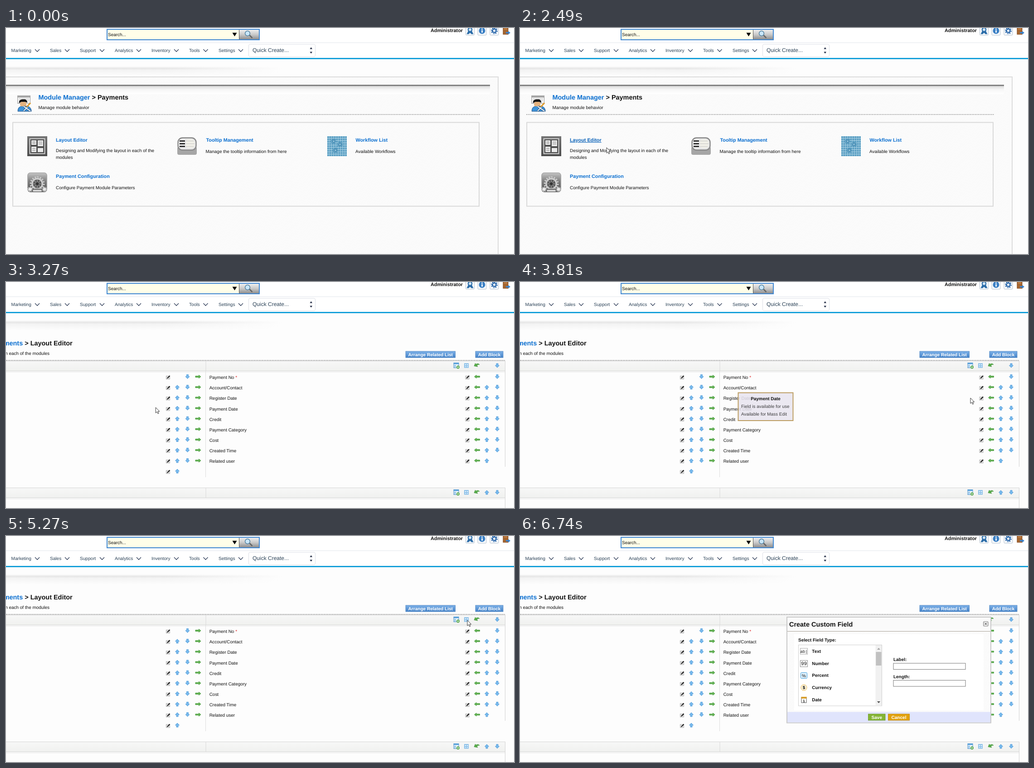
An HTML page that plays this animation: 1121x499 px, repeating every 7990 ms.

```html
<!DOCTYPE html>
<html lang="en">
<head>
<meta charset="utf-8">
<title>Layout editor walkthrough</title>
<style>
html, body { margin: 0; width: 100%; height: 100%; overflow: hidden; background: #fdfdfd; }
svg { display: block; width: 1121px; height: 499px; }
text { font: 9.95px Arial, "Liberation Sans", sans-serif; fill: #111; text-rendering: geometricPrecision; white-space: pre; }
.b { font-weight: bold; }
.h { font-weight: bold; font-size: 14.45px; }
.l { font-weight: bold; font-size: 10.8px; fill: #0b6fd0; }
.n { font-size: 10.1px; fill: #2b4257; }
.w { font-weight: bold; font-size: 10.05px; fill: #fff; }
</style>
</head>
<body>
<svg id="stage" viewBox="0 0 1121 499" xmlns="http://www.w3.org/2000/svg"></svg>
<script>
const LOOP = 7990;
const list = (n, f) => Array.from({ length: n }, (_, i) => f(i)).join('');
const text = (x, y, s, cls = '', more = '') => `<text x="${x}" y="${y}" class="${cls}" ${more}>${s}</text>`;
const rect = (x, y, w, h, fill, more = '') => `<rect x="${x}" y="${y}" width="${w}" height="${h}" fill="${fill}" ${more}/>`;
const path = (d, fill, more = '') => `<path d="${d}" fill="${fill}" ${more}/>`;
const line = (d, stroke, w = 1, more = '') => path(d, 'none', `stroke="${stroke}" stroke-width="${w}" ${more}`);
const disc = (x, y, r, fill, more = '') => `<circle cx="${x}" cy="${y}" r="${r}" fill="${fill}" ${more}/>`;
const use = (id, x, y) => `<use href="#${id}" x="${x}" y="${y}"/>`;
const group = (id, body, more = '') => `<g id="${id}" ${more}>${body}</g>`;
const gear = (x, y, r, teeth, fill, w = r * .5) =>
  disc(x, y, r, fill) + disc(x, y, r + w / 2, 'none', `stroke="${fill}" stroke-width="${w}" pathLength="${teeth * 2}" stroke-dasharray="1"`);
const fade = (id, dir, ...stops) =>
  `<linearGradient id="${id}" x2="${dir === 'x' ? 1 : 0}" y2="${dir === 'x' ? 0 : 1}">` +
  stops.map(([o, c, a = 1]) => `<stop offset="${o}" stop-color="${c}" stop-opacity="${a}"/>`).join('') + '</linearGradient>';

const defs = '<defs>' +
  `<pattern id="hatch" width="3.6" height="3.6" patternUnits="userSpaceOnUse" viewBox="0 0 4 4">${rect(0, 0, 4, 4, '#fdfdfd')}${line('M-1 1L1 -1M0 4L4 0M3 5L5 3', '#f3f3f3', 1)}</pattern>` +
  fade('swoosh', 'y', [0, '#fbfbfb'], [.2, '#e6e6e6'], [.35, '#f3f3f3'], [1, '#fdfdfd']) +
  fade('toWhite', 'x', [0, '#fdfdfd', 0], [1, '#fdfdfd']) +
  fade('shade', 'y', [0, '#555'], [.1, '#888'], [.16, '#dedede'], [.5, '#f6f6f6'], [1, '#fff']) +
  fade('steel', 'y', [0, '#eee'], [.5, '#c9c9c9'], [1, '#8f8f8f']) +
  fade('dark', 'y', [0, '#747474'], [1, '#4c4c4c']) +
  fade('plate', 'y', [0, '#c4c4c4'], [.45, '#7c7c7c'], [1, '#4a4a4a']) +
  fade('bar', 'y', [0, '#f7f7f7'], [1, '#f0f1ef']) +
  fade('blue', 'y', [0, '#7db1e8'], [1, '#4583c8']) +
  group('down', path('M-2 -4.5H2V-.3H4.5L0 4.5L-4.5 -.3H-2Z', '#78bbee', 'stroke="#4391d3" stroke-width=".8"')) +
  group('up', path('M-2 4.5H2V.3H4.5L0 -4.5L-4.5 .3H-2Z', '#78bbee', 'stroke="#4391d3" stroke-width=".8"')) +
  group('right', path('M-6 -1.4H1.5V-3.6L6 0L1.5 3.6V1.4H-6Z', '#65b553', 'stroke="#3c9134" stroke-width=".8"')) +
  group('left', path('M6 -1.4H-1.5V-3.6L-6 0L-1.5 3.6V1.4H6Z', '#65b553', 'stroke="#3c9134" stroke-width=".8"')) +
  group('edit', rect(-4.5, -3, 8, 7, '#e4e4e4', 'stroke="#a5a5a5" stroke-width=".8"') +
    line('M-2 2L3.5 -3.5', '#222', 2.3) + line('M-2.8 2.8L-1.8 1.8', '#222', 1)) +
  group('addField', rect(-6, -6, 11, 11, '#eef6fd', 'stroke="#4a90c8"') + rect(-6, -6, 11, 3, '#5aa2dc') +
    rect(-4.5, -1.5, 3, 5.5, '#8ec0e6') + disc(3.5, 3.5, 3.4, '#52a447') + line('M1.6 3.5H5.4M3.5 1.6V5.4', '#fff')) +
  group('grid', rect(-5, -5, 10, 10, '#7fb9e6') + rect(-3.5, -3, 3, 2.5, '#eaf5fd') + rect(.8, -3, 3, 2.5, '#eaf5fd') +
    rect(-3.5, 1, 3, 2.5, '#d5eafa') + rect(.8, 1, 3, 2.5, '#d5eafa')) +
  group('undo', path('M-6 1L-3.5 -5L-2 -3Q3 -6 6 -2Q2 -3 .3 .2L2 2.5Z', '#58ad4a', 'stroke="#3b8c35" stroke-width=".7"')) +
  group('arrow', path('M0 0V12.2L2.9 9.6L4.9 14L6.8 13.1L4.9 8.9H8.6Z', '#fff', 'stroke="#222" stroke-width=".9" stroke-linejoin="round"')) +
  group('hand', path('M-1.4 1Q0 -1 1.3 1V6Q2.5 5 3.4 6.3Q4.6 5.4 5.4 6.8Q7 6.2 7.2 8V11Q7 13 5.8 15.3H-.6Q-1.2 13 -4 9.6Q-4.2 7.8 -2.7 8.2L-1.4 9.4Z', '#fff',
    'stroke="#222" stroke-width=".9" stroke-linejoin="round"') + line('M1.3 6V9M3.4 6.5V9M5.4 7V9', '#444', .6)) +
  '</defs>';

// Search box and account icons move when the page has no scroll bar.
function topBar(id, x, w, dx) {
  const bx = x + w - 45.5;
  const tile = cx => rect(cx - 9.5, -4, 19, 20, '#f5f8fb', 'rx="2" stroke="#b7c3d0"');
  const user = tile(1024) + path('M1016.5 13.5L1020 6.5H1028L1031.5 13.5H1027L1024 10.5L1021 13.5Z', '#2b6ca8') +
    disc(1024, 3.6, 4.2, '#cfe3f3', 'stroke="#2b6ca8" stroke-width="2.2"');
  const info = tile(1050.5) + disc(1050.5, 6, 7, '#3a7fc4') + rect(1049.3, 4.8, 2.6, 5.5, '#fff') + disc(1050.5, 2.4, 1.4, '#fff');
  const cog = tile(1077.5) + gear(1077.5, 6, 5, 8, '#1f5fa6', 2.4) + disc(1077.5, 6, 2.7, '#f5f8fb');
  const door = rect(1097, -2, 11, 16, '#a5652f', 'stroke="#84491c"') + rect(1099, -1, 7, 5, '#b97a41') +
    path('M1103 9H1108V6.5L1113 10.5L1108 14.5V12H1103Z', '#3b83cc');
  return group(id,
    rect(x + 1, 3, w - 2, 23, '#fffee9', 'stroke="#3f87d2" stroke-width="2"') +
    rect(bx, 4, 43.5, 21, 'url(#steel)') + line(`M${bx} 4V25`, '#555') +
    text(x + 3, 18, 'Search...') + path(`M${bx - 15} 10.5H${bx - 5}L${bx - 10} 18.5Z`, '#000') +
    line(`M${bx + 23} 16L${bx + 29} 22`, '#666', 2.6) +
    disc(bx + 18.5, 12, 5.4, '#c9e6f7', 'stroke="#4f7f9f" stroke-width="1.5"') +
    `<g transform="translate(${dx})">${text(937, 9, 'Administrator', 'b', 'style="font-size:10.83px"')}${user}${info}${cog}${door}</g>`);
}

const menu = [['Marketing', 11.5, 69], ['Sales', 97, 135], ['Support', 163, 212], ['Analytics', 240, 293], ['Inventory', 321, 376], ['Tools', 404, 440.5], ['Settings', 469, 518]];
const nav = rect(0, 0, 1121, 67, '#fff') + line('M0 32.5H1121', '#e3e6ec') + rect(0, 66, 1121, 2.8, '#0b9cd8') +
  menu.map(([s, x, c]) => text(x, 53, s, 'n') + line(`M${c - 5} 47L${c} 52.2L${c + 5} 47`, '#33415c', 1.3)).join('') +
  rect(535.5, 36, 147, 27.5, '#fff', 'rx="3" stroke="#dcdfe6"') +
  text(544, 53.3, 'Quick Create...', 'n', 'style="font-size:12px"') +
  path('M670.5 46.5H676L673.2 42.5ZM670.5 52.5H676L673.2 56.5Z', '#1d2740') +
  rect(0, 85, 610, 22, 'url(#swoosh)') + rect(350, 85, 261, 22, 'url(#toWhite)');

const dots = (x, y, end) => line(`M${x} ${y}H${end}`, '#a0a0a0', 1.9, 'stroke-dasharray="1.8"');

const managerIcon = rect(25.5, 149.5, 28, 17, '#f3f3f3', 'stroke="#999"') + rect(25, 149, 29, 4.5, '#a5a5a5') +
  line('M28 156.5H51M28 160H51', '#c4c4c4') + path('M26 184Q26 173 36 172.5H46Q56 174 56 184Z', '#3f94da', 'stroke="#1d4f85"') +
  rect(31, 163, 14, 10, '#e4b27e', 'rx="4"') + path('M28.5 166Q28 158 36 157.5H42Q47 159 47 165L42 163H34Z', '#151515') +
  line('M45 175L54 165.5', '#dd9a2c', 3.2) + line('M39 173L54 183.5M39 183L47 175', '#234d78', 4) + line('M39 173L54 183.5M39 183L47 175', '#e4eef7', 2.4);

const layoutIcon = rect(47, 239, 44, 44, 'url(#dark)') + rect(52.5, 244.5, 33, 33, '#505050', 'stroke="#d6d6d6" stroke-width="2"') +
  rect(56, 248, 11, 10, '#e9e9e9') + rect(70, 248, 12, 13, '#e9e9e9') + rect(56, 262, 11, 12, '#e9e9e9') + rect(70, 265, 12, 9, '#e9e9e9') +
  line('M58 251.5H65M58 254.5H65M72 252H80M72 256H80M58 266H65M58 270H65', '#777', 1.2);

const tipIcon = rect(378, 262, 43, 18, '#a6a6a6', 'rx="4"') + rect(379.5, 242.5, 40, 27, '#e8e8e8', 'rx="10" stroke="#898989" stroke-width="2.4"') +
  rect(397, 246, 19, 19, '#f1f0e8', 'rx="6"') + line('M383 249.5H395M383 255.5H395M383 261.5H395', '#111', 2.4) + line('M397 249.5H414M397 255.5H416M397 261.5H414', '#c6c6c6');

const flowIcon = rect(709, 239, 43, 44, '#5b9fc3') +
  line(list(8, i => `M${713 + i * 5} 239v44`) + list(8, i => `M709 ${243.5 + i * 5}h43`), '#b4d7e8', .9) +
  [[723, 250], [737, 257], [727, 270]].map(([x, y]) => gear(x, y, 4.2, 8, '#5094ba') + disc(x, y, 1.5, '#a5cfe3')).join('');

const cogIcon = rect(47.8, 319.8, 42.4, 42.4, 'url(#plate)', 'rx="6" stroke="#a8a8a8" stroke-width="1.6"') +
  gear(69, 344, 13, 16, '#cdcdcd', 3.5) + disc(69, 344, 9.5, '#5a5a5a') +
  line(list(8, i => `M69 344L${69 + 9 * Math.cos(i * Math.PI / 4)} ${344 + 9 * Math.sin(i * Math.PI / 4)}`), '#a9a9a9', 1.2) + disc(69, 344, 3.2, '#333') +
  rect(50, 355, 38, 6, '#5f5f5f') + gear(53, 356, 3.6, 8, '#e8e8e8') + gear(85, 356, 3.6, 8, '#e8e8e8') + rect(59, 357, 20, 4, '#d2d2d2', 'rx="2"');

const modulePage = group('modules',
  rect(-5, 108, 1091, 400, 'url(#hatch)', 'stroke="#dcdcdc" stroke-width="2"') +
  rect(0, 125.5, 1068, 20.5, 'url(#shade)') + managerIcon +
  text(71.5, 158, '<tspan fill="#0b6fd0">Module Manager</tspan> &gt; Payments', 'h') +
  text(71.5, 179, 'Manage module behavior') + dots(14, 191, 1046) +
  rect(15, 208.5, 1029, 185, 'none', 'stroke="#d9d9d9" stroke-width="2"') +
  layoutIcon + tipIcon + flowIcon + cogIcon +
  text(110, 251, 'Layout Editor', 'l', 'id="link"') +
  text(110, 274, 'Designing and Modifying the layout in each of the') + text(110, 288.5, 'modules') +
  text(441.5, 251, 'Tooltip Management', 'l') + text(440.5, 276, 'Manage the tooltip information from here') +
  text(771.5, 251, 'Workflow List', 'l') + text(771, 276, 'Available Workflows') +
  text(110, 330.5, 'Payment Configuration', 'l') + text(110, 355.7, 'Configure Payment Module Parameters'));

const button = (x, w, s, fill, edge) => rect(x, 153, w, 14, fill, `stroke="${edge}" stroke-width=".8"`) +
  text(x + w / 2, 163.6, s, 'w', 'text-anchor="middle"');
const buttons = (dx, fill, edge) => button(882 + dx, 109.5, 'Arrange Related List', fill, edge) + button(1036 + dx, 61, 'Add Block', fill, edge);

const heading = text(146.7, 140, '<tspan fill="#0b6fd0">Module Manager &gt; Payments</tspan> &gt; Layout Editor', 'h', 'text-anchor="end"') +
  text(96, 161, 'Designing and Modifying the layout in each of the modules', '', 'text-anchor="end"');

const blockBar = (y, icons) => rect(0, y, 1102, 22, 'url(#bar)') + line(`M0 ${y + 22}H1102M0 ${y}H1102`, '#d5d5d5') +
  line(`M0 ${y + 24.5}H1102`, '#e6e6e6') + line(`M441 ${y}V${y + 22}`, '#d8d8d8') +
  icons.map(([id, x]) => use(id, x, y + 10)).join('');
const tools = [['addField', 994], ['grid', 1016], ['undo', 1039], ['down', 1084]];
const labels = ['Payment No <tspan fill="#d22">*</tspan>', 'Account/Contact', 'Register Date', 'Payment Date', 'Credit', 'Payment Category', 'Cost', 'Created Time', 'Related user'];
const rowY = i => 210 + i * 23.17;
const controls = (i, last, xs, side, sideLast) => {
  const y = rowY(i);
  return use('edit', xs[0], y + .5) + (i ? use('up', xs[1], y - 1) : '') + (i < last ? use('down', xs[2], y - 1) : '') +
    (i < last || sideLast ? use(side, xs[3], y - 1) : '');
};

const emptyPage = group('empty', heading + buttons(15, '#566dae', '#4a5e9c') + dots(0, 173, 1117));

const editorPage = group('editor', heading + buttons(0, 'url(#blue)', '#4a80bd') +
  blockBar(174.5, tools) + blockBar(454.5, [...tools, ['up', 1061]]) + dots(0, 173, 1102) +
  line('M440.5 197V431', '#dedede') + line('M1101.5 175V408M1101.5 455V499', '#d2d2d2') +
  labels.map((s, i) => text(448.7, rowY(i) + 4, s)).join('') +
  list(10, i => controls(i, 9, [358, 378, 400.5, 424], 'right', false)) +
  list(9, i => controls(i, 8, [1018.5, 1061, 1084, 1039.5], 'left', true)));

const tooltip = group('tip', rect(481.5, 244.5, 121, 61.5, '#e9e5ef', 'fill-opacity=".87" stroke="#bd9e62" stroke-width="2"') +
  text(542, 260.5, 'Payment Date', 'b', 'text-anchor="middle"') +
  text(488, 277.5, 'Field is available for use', '', 'fill-opacity=".8"') + text(488, 295, 'Available for Mass Edit', '', 'fill-opacity=".8"'));

const mono = 'text-anchor="middle" style="font:9px \'Liberation Mono\',monospace"';
const typeIcons = [
  y => rect(618.5, y - 6, 16, 13, '#fff', 'stroke="#aaa"') + text(626.5, y + 4, 'ab|', '', mono),
  y => rect(618.5, y - 6, 16, 14, '#fff', 'stroke="#888"') + text(626.5, y + 4.5, '99', '', mono.replace('9px', '11px')),
  y => rect(619.5, y - 6, 14, 13, '#dff1fc', 'rx="2" stroke="#3f9ddb"') + text(626.5, y + 4.2, '%', '', 'text-anchor="middle"'),
  y => disc(626.5, y + .5, 6.5, '#fff6dc', 'stroke="#e5b44d"') + text(626.5, y + 4, '$', 'b', 'text-anchor="middle"'),
  y => rect(621, y - 5, 11, 12, '#fff', 'stroke="#555"') + rect(620.5, y - 6, 12, 4, '#d9a030') + text(626.5, y + 6, '1', 'b', 'text-anchor="middle" style="font-size:8px"')
];
const action = (x, w, s, fill, edge) => rect(x, 393, w, 14, fill, `stroke="${edge}" stroke-width=".8"`) + text(x + w / 2, 403.6, s, 'w', 'text-anchor="middle"');
const dialog = group('dialog',
  rect(589, 179, 450, 233.5, 'url(#hatch)', 'stroke="#c9c9c9" stroke-width="2"') +
  rect(590, 180, 448, 30, '#fafafa') + line('M590 210.5H1038', '#aaa398', 1.2) +
  text(594, 199.5, 'Create Custom Field', 'h') +
  rect(1022.8, 189, 10, 10, '#fff', 'rx="1.5" stroke="#777" stroke-width="1.2"') + line('M1025.3 191.5l5 5m0 -5l-5 5', '#666', 1.2) +
  rect(605, 217, 418, 168, '#fff') + rect(590, 388.5, 448, 23, '#e0e4fc') +
  text(614, 233, 'Select Field Type:', 'b') + rect(614.5, 240.5, 184, 134.5, '#fff', 'stroke="#cfcfcf"') +
  rect(784.5, 241, 13.5, 133.5, '#f1f1f1') + rect(785.3, 256, 12, 30, '#c1c1c1') +
  path('M788 251H795L791.5 247Z', '#a3a3a3') + path('M788 365H795L791.5 369Z', '#505050') +
  ['Text', 'Number', 'Percent', 'Currency', 'Date'].map((s, i) => typeIcons[i](254 + i * 26.75) + text(644.3, 257.8 + i * 26.75, s, 'b')).join('') +
  text(824, 276, 'Label:', 'b') + text(824, 314, 'Length:', 'b') +
  rect(824, 281, 159, 13.5, '#fff', 'stroke="#777"') + rect(824, 318.5, 159, 13.5, '#fff', 'stroke="#777"') +
  action(768.5, 37.5, 'Save', '#84b434', '#6d9928') + action(812.5, 47, 'Cancel', '#e2a20e', '#bd8607'));

const stage = document.getElementById('stage');
stage.innerHTML = defs + rect(0, 0, 1121, 499, '#fdfdfd') + nav + topBar('top', 222, 338, 0) + topBar('topWide', 227, 342, 15.3) +
  modulePage + emptyPage + editorPage + tooltip + dialog + '<use id="cursor" href="#arrow"/>';
const el = id => document.getElementById(id);

// Pointer strokes: first step, last step, number of steps, way points.
const strokes = [
  [210, 920, 10, [[1090, 522], [820, 370], [510, 262], [270, 214], [110, 224]]],
  [1070, 1250, 4, [[110, 224], [133, 251]]],
  [2030, 2110, 2, [[133, 251], [177, 262]]],
  [2260, 2490, 4, [[177, 262], [191, 264]]],
  [3130, 3810, 10, [[191, 264], [450, 284], [760, 278], [994, 256]]],
  [3890, 4670, 11, [[994, 256], [987, 236], [1036, 200], [1084, 173], [1055, 174], [1025, 180]]],
  [4730, 4960, 4, [[1025, 180], [1014, 187], [1018, 186]]],
  [5660, 6420, 11, [[1018, 186], [850, 225], [665, 285], [647, 345], [720, 386], [802, 404]]],
  [6500, 6500, 1, [[802, 404], [803, 405]]],
  [6650, 6650, 1, [[803, 405], [805, 411]]]
];

function along(pts, p) {
  const last = pts.length - 1, i = Math.min(last - 1, Math.floor(p * last)), u = p * last - i;
  const pt = k => pts[Math.max(0, Math.min(last, k))];
  return [0, 1].map(a => {
    const [p0, p1, p2, p3] = [-1, 0, 1, 2].map(k => pt(i + k)[a]);
    return p1 + .5 * u * (p2 - p0 + u * (2 * p0 - 5 * p1 + 4 * p2 - p3 + u * (3 * (p1 - p2) + p3 - p0)));
  });
}

function pointer(t) {
  const stroke = strokes.filter(s => t >= s[0]).pop();
  if (!stroke || t >= 6740) return null;
  const [from, to, n, pts] = stroke;
  const step = n > 1 ? Math.min(n - 1, Math.floor((t - from + 2) * (n - 1) / (to - from))) : 0;
  return along(pts, (step + 1) / n);
}

const show = (id, on) => el(id).setAttribute('display', on ? 'inline' : 'none');
const within = ([x, y], l, t, r, b) => x >= l && x <= r && y >= t && y <= b;

function draw(t) {
  const pos = pointer(t), loading = t >= 3050 && t < 3130, editing = t >= 3130;
  show('top', !loading);
  show('topWide', loading);
  show('modules', t < 3050);
  show('empty', loading);
  show('editor', editing);
  show('dialog', t >= 5360);
  const tipOn = editing && pos && pos[0] > 470 && t < 5270;
  show('tip', tipOn);
  el('tip').setAttribute('opacity', t >= 5190 ? .45 : 1);

  const link = el('link');
  link.style.textDecoration = t >= 1185 ? 'underline' : 'none';
  link.style.fill = t >= 1490 && t < 1660 ? '#084a8c' : t >= 1185 ? '#0a62b8' : '';

  show('cursor', pos);
  if (!pos) return;
  const overLink = t < 3050 && within(pos, 110, 242, 180, 254);
  const overSave = t >= 5360 && within(pos, 768, 393, 806, 407);
  el('cursor').setAttribute('href', overLink || overSave ? '#hand' : '#arrow');
  el('cursor').setAttribute('transform', `translate(${pos.map(v => v.toFixed(2))})`);
}

const start = performance.now();
function tick() {
  draw((performance.now() - start) % LOOP);
  requestAnimationFrame(tick);
}
tick();
</script>
</body>
</html>
```
